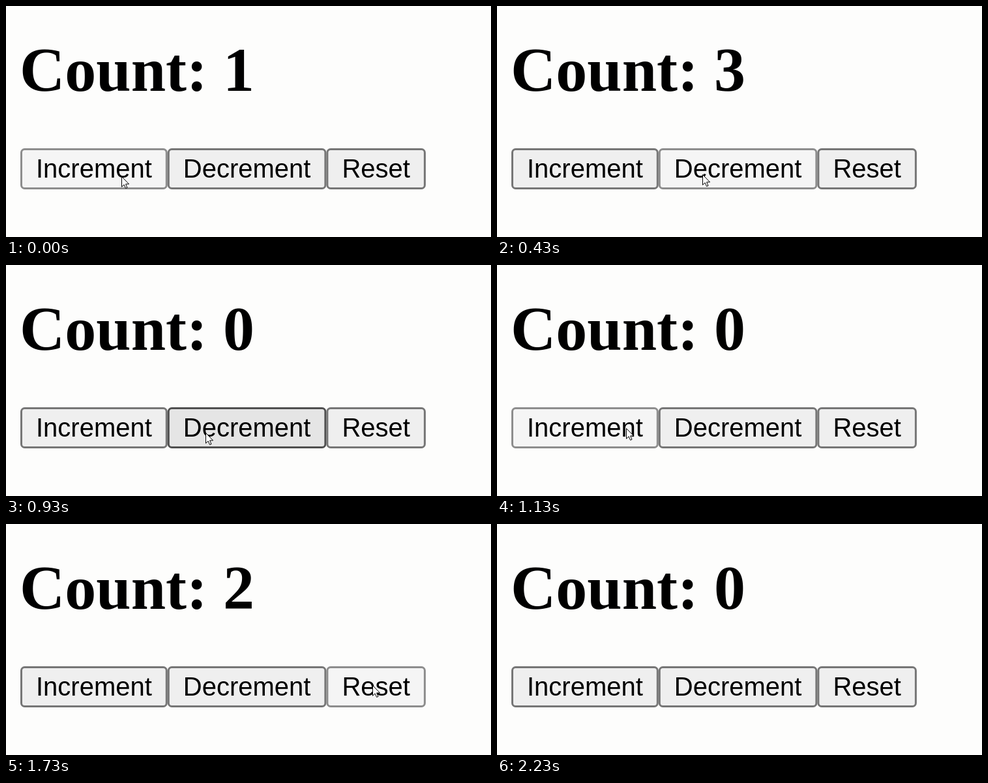
Recreate the animation shown at these times as an HTML page. Size 744 by 354 pixels, loop 2.96 s.

```html
<!DOCTYPE html>
<html lang="en">
<head>
<meta charset="utf-8">
<title>Counter</title>
<style>
  html, body { margin: 0; width: 100%; height: 100%; overflow: hidden; background: #fdfdfc; }
  svg { display: block; }
  #count { font: bold 96px "Liberation Serif", "Times New Roman", serif; }
  .button text { font: 40px "Liberation Sans", Arial, sans-serif; }
  .button rect { fill: #efefef; stroke: #767676; stroke-width: 3; }
  .hover rect { fill: #e5e5e5; stroke: #4f4f4f; }
  .active rect { fill: #f5f5f5; stroke: #8d8d8d; }
</style>
</head>
<body>
<svg width="744" height="354" viewBox="0 0 744 354">
  <text id="count" x="21" y="130">Count: 1</text>
  <g id="buttons"></g>
  <path id="cursor" d="M.5 .5V16.2L4.1 12.8L6.6 18.4L9 17.4L6.6 11.9H11.6Z"
        fill="#fff" stroke="#000"/>
</svg>
<script>
const LOOP = 2960, STEP = 100 / 3;
const PERIOD = 180, HOLD = 80, TRAVEL = 170, SETTLE = 30;
const LEAVE = 2133, EXIT = 2225;

const increment = { label: 'Increment', x: 22, width: 225.8, apply: n => n + 1 };
const decrement = { label: 'Decrement', x: 247.8, width: 243.6, apply: n => n - 1 };
const reset = { label: 'Reset', x: 491.4, width: 152.5, apply: () => 0 };
const buttons = [increment, decrement, reset];

// Each visit: the cursor rests on a button and presses it at a steady pace
const visits = [
  { button: increment, x: 177, y: 261, start: -40, presses: 2 },
  { button: decrement, x: 315, y: 258, start: 405, presses: 3 },
  { button: increment, x: 198, y: 250, start: 1105, presses: 2 },
  { button: reset, x: 562, y: 247, start: 1680, presses: 1 }
];
const count = document.getElementById('count');
const cursor = document.getElementById('cursor');
const group = document.getElementById('buttons');

group.innerHTML = buttons.map(({ label, x, width }) => `<g class="button">
  <rect x="${x + 1.5}" y="219.5" width="${width - 3}" height="60" rx="5"/>
  <text x="${x + 24}" y="263">${label}</text></g>`).join('');

const clamp = v => Math.min(1, Math.max(0, v));
const smooth = p => p * p * (3 - 2 * p);

function cursorAt(t) {
  let { x, y } = visits[0];
  for (const v of visits.slice(1)) {
    const e = smooth(clamp((t - v.start + SETTLE + TRAVEL) / TRAVEL));
    x += (v.x - x) * e;
    y += (v.y - y) * e;
  }
  const flick = Math.max(0, t - LEAVE) / STEP;
  return [Math.round(x + 3 * flick ** 2), Math.round(y - 20.5 * flick ** 2)];
}

function counterAt(t) {
  let value = 1, pressed = false;
  for (const { button, start, presses } of visits) {
    for (let i = 0; i < presses; i++) {
      const age = t - start - i * PERIOD;
      if (age >= HOLD) value = button.apply(value);
      else if (age >= 0) pressed = true;
    }
  }
  return { value, pressed };
}

function draw() {
  const now = performance.now() % LOOP;
  const t = Math.floor((now + 3.4) / STEP) * STEP;
  const [x, y] = cursorAt(t);
  const { value, pressed } = counterAt(t);
  const visible = t < EXIT;

  count.textContent = 'Count: ' + value;
  cursor.setAttribute('transform', `translate(${x} ${y})`);
  cursor.style.display = visible ? '' : 'none';
  buttons.forEach((b, i) => {
    const over = visible && x >= b.x && x < b.x + b.width && y >= 218 && y < 281;
    const state = over ? (pressed ? ' active' : ' hover') : '';
    group.children[i].setAttribute('class', 'button' + state);
  });
  requestAnimationFrame(draw);
}
draw();
</script>
</body>
</html>
```
